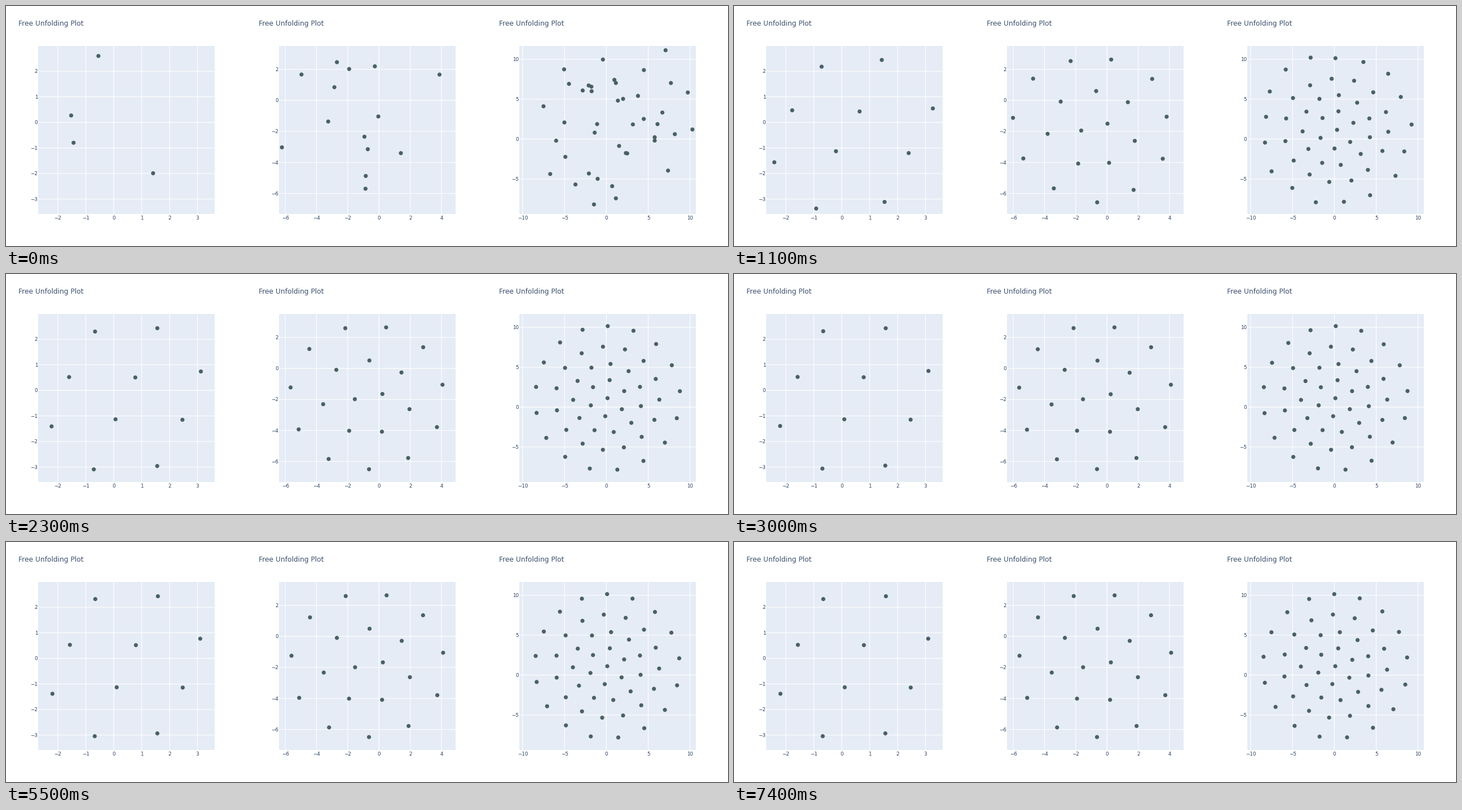
A matplotlib script that plays this animation: 1280x427 px, repeating every 7500 ms.

```python
import numpy as np
import matplotlib.pyplot as plt
from matplotlib.animation import FuncAnimation
from matplotlib.patches import Rectangle

W, H, DPI = 1280, 427, 64
FRAMES, STEP = 75, 100
INK, TITLE_INK, PLOT, DOT = "#2a3f5f", "#3d506e", "#e5ecf6", "#4a6066"
TITLE = "Free Unfolding Plot"
TOP, BOTTOM, WIDTH = 71, 370, 313
DRIFT_START = 3900

plt.rcParams["font.family"] = "DejaVu Sans"
fig = plt.figure(figsize=(W / DPI, H / DPI), dpi=DPI, facecolor="white")
ax = fig.add_axes([0, 0, 1, 1])
ax.set(xlim=(0, W), ylim=(H, 0))
ax.axis("off")


def pt(px):
    return px * 72 / DPI


def label(x, y, text, size=8.7, ha="center", color=INK):
    ax.text(x, y, text, fontsize=pt(size), color=color, ha=ha, va="baseline")


def tick(value):
    return str(value).replace("-", "\u2212")


def axis(first, last, step, zero, unit):
    return [(n, zero + n * unit) for n in range(first, last + 1, step)]


def grid_line(xs, ys, value):
    ax.plot(xs, ys, color="white", lw=pt(1.3 if value == 0 else 1.1),
            solid_capstyle="butt", snap=False, zorder=2)


def match(dots, homes):
    """Reorder dots by pairwise swaps so that each has a short way home."""
    dots, improved = dots.copy(), True

    def cost(p, q):
        return ((p - q) ** 2).sum()

    while improved:
        improved = False
        for i in range(len(dots)):
            for j in range(i):
                now = cost(dots[i], homes[i]) + cost(dots[j], homes[j])
                swapped = cost(dots[j], homes[i]) + cost(dots[i], homes[j])
                if swapped < now - 1e-6:
                    dots[[i, j]] = dots[[j, i]]
                    improved = True
    return dots


def ring(center, count, radius, start, swell=0, sway=0, phase=0, turn=0):
    """Evenly spaced dots; swell makes the ring oval, sway bunches the dots."""
    a = np.radians(start) + 2 * np.pi * np.arange(count) / count
    a = a + np.radians(sway) * np.cos(a - np.radians(phase)) + turn
    r = radius * (1 + swell * np.cos(2 * a))
    return np.c_[center[0] + r * np.cos(a), center[1] + r * np.sin(a)]


def small_layout(t):
    half = np.array([(-55, -119.5), (56, -124.5), (131, -49),
                     (100, 38), (17, -37.5)])
    return np.vstack([half, -half]) + (213.3, 221)


def medium_layout(t):
    center = 641, 219
    return np.vstack([ring((643.5, 218.5), 2, 25, 170),
                      ring(center, 7, 72, 221.7, swell=0.1),
                      ring(center, 11, 132, 252.5, swell=0.03)])


def large_layout(t):
    """The core turns slowly one way while the rim slips the other way."""
    center = 1066, 221
    p = max(0, t - DRIFT_START) / 3500
    core, rim = 0.04 * p, -0.021 * p
    return np.vstack([
        ring(center, 1, 0, 0),
        ring(center, 6, 32.2, 277, turn=core),
        ring(center, 11, 61, 275.3, turn=core),
        ring(center, 15, 92, 264, sway=2, phase=320, turn=core),
        ring(center, 17, 128.3, 271.6, sway=2.3, phase=150, turn=rim)])


class Panel:
    def __init__(self, left, x_axis, y_axis, layout, spread, seed):
        label(left - 35.5, 35.4, TITLE, 12.2, "left", TITLE_INK)
        box = ax.add_patch(Rectangle((left, TOP), WIDTH, BOTTOM - TOP,
                                     fc=PLOT, lw=0))
        for value, x in x_axis:
            grid_line([x, x], [TOP, BOTTOM], value)
            label(x, 380, tick(value))
        for value, y in y_axis:
            grid_line([left, left + WIDTH], [y, y], value)
            label(left - 0.7, y + 3.2, tick(value), ha="right")

        self.layout = layout
        homes = layout(0)
        rng = np.random.default_rng(seed)
        scatter = rng.normal(homes.mean(axis=0), spread, homes.shape)
        self.offset = match(scatter, homes) - homes
        # One colour per dot keeps the markers off the pixel-snapping path.
        self.dots = ax.scatter(*homes.T, s=pt(7.2) ** 2, c=[DOT] * len(homes),
                               linewidths=0, zorder=3)
        self.dots.set_clip_path(box)

    def show(self, t):
        decay = np.exp(-(t / 297) ** 0.75)
        self.dots.set_offsets(self.layout(t) + self.offset * decay)


panels = [
    Panel(57, axis(-2, 3, 1, 191, 49.5), axis(-3, 2, 1, 207, -45.5),
          small_layout, spread=150, seed=4),
    Panel(484, axis(-6, 4, 2, 661.3, 27.7), axis(-6, 2, 2, 168, -27.6),
          medium_layout, spread=120, seed=7),
    Panel(910, axis(-10, 10, 5, 1064.4, 14.84), axis(-5, 10, 5, 236.7, -14.2),
          large_layout, spread=100, seed=2),
]


def update(frame):
    for panel in panels:
        panel.show(frame * STEP)
    return [panel.dots for panel in panels]


anim = FuncAnimation(fig, update, frames=FRAMES, interval=STEP,
                     repeat=True, repeat_delay=0)
plt.show()
```
